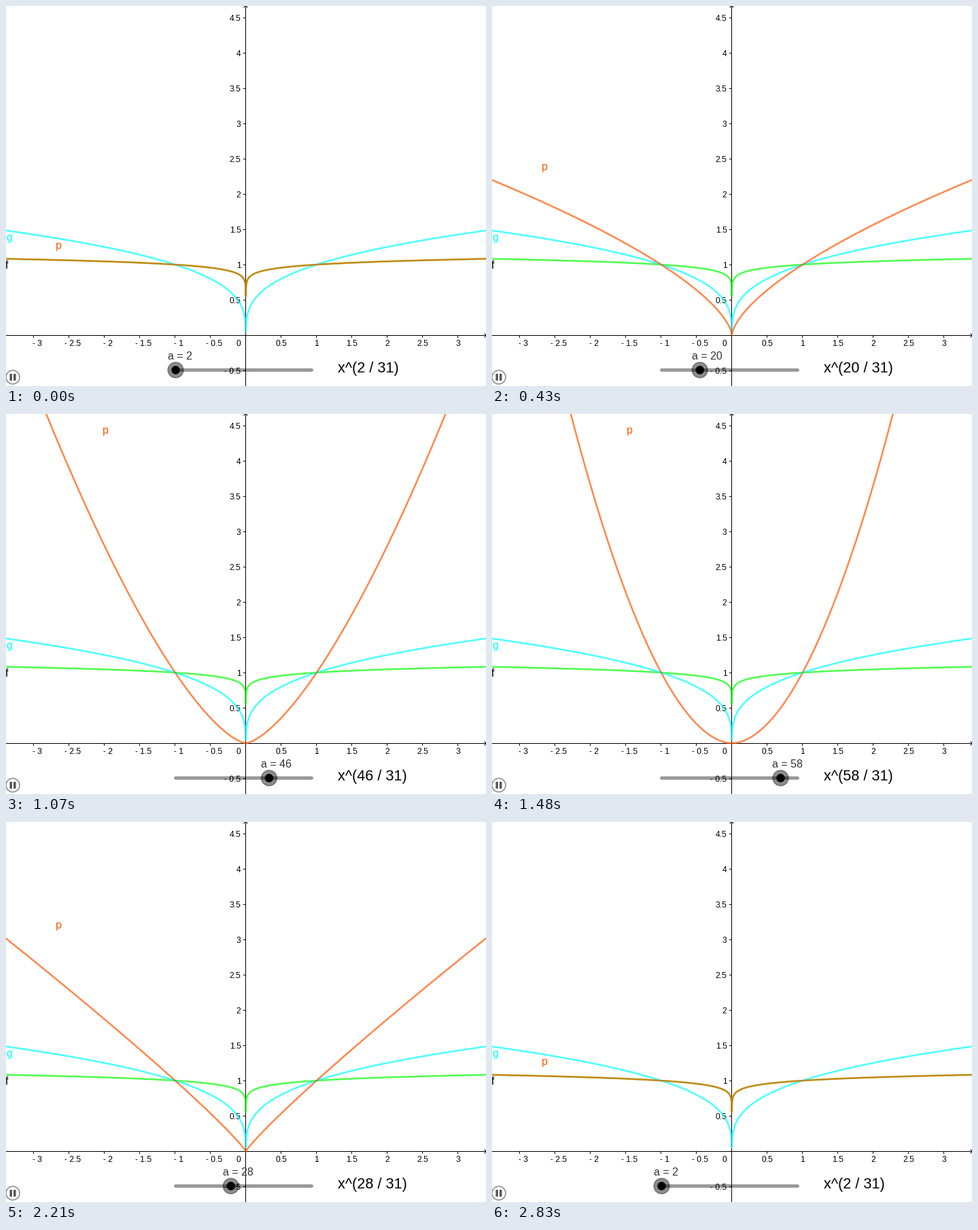
Animation of 706x560 px, one loop 2.88 s. Source, as a matplotlib script:

```python
import numpy as np
import matplotlib.pyplot as plt
from matplotlib.animation import FuncAnimation
from matplotlib.patches import Circle, Rectangle

W, H, DPI = 706, 560, 100
PX = 72 / DPI                 # points per pixel
AX, AY = 352.5, 485.5         # axis lines, on pixel centres
OX, OY, UNIT = 352.8, 485.1, 104
LOOP, TICK = 2880, 10
STEPS = 59                    # slider runs 2..60 and back to 2
DEN = 31
BAR_X, BAR_Y, BAR_STEP = 249.5, 536.5, 3.125

ORANGE = (1, 1 / 3, 0)
CYAN = (0, 1, 1)
GREEN = (0, 1, 0)

# Start time of each slider step, slightly uneven
KEY_STEPS = [0, 1, 9, 12, 24, 30, 34, 35, 57, 59]
KEY_TIMES = [0, 50, 430, 570, 1170, 1480, 1670, 1710, 2780, 2880]
STARTS = np.round(np.interp(np.arange(STEPS), KEY_STEPS, KEY_TIMES) / 10) * 10

plt.rcParams["font.family"] = "Liberation Sans"
fig = plt.figure(figsize=(W / DPI, H / DPI), dpi=DPI, facecolor="white")
ax = fig.add_axes([0, 0, 1, 1])
ax.set_xlim(0, W)
ax.set_ylim(H, 0)
ax.axis("off")


def label(x, y, s, size=12, color="black", ha="left", z=1):
    return ax.text(x, y, s, fontsize=size * PX, color=color, ha=ha,
                   va="baseline", zorder=z)


def stroke(xs, ys, width=1, color="black", z=1, **kw):
    return ax.plot(xs, ys, color=color, lw=width * PX, zorder=z,
                   snap=False, **kw)[0]


def number(v):
    return ("- " if v < 0 else "") + f"{abs(v):g}"


def draw_axes():
    stroke([0, W], [AY, AY])
    stroke([AX, AX], [0, H])
    stroke([350, AX, 355], [2, -0.5, 2])
    stroke([704, 706.5, 704], [483, AY, 488])
    for k in range(-6, 7):
        if k:
            x = AX + k * UNIT / 2
            stroke([x, x], [AY, AY + 3.5], solid_capstyle="butt")
            label(x + (5.5 if k < 0 else 0), 501, number(k / 2), ha="center")
    label(341.5, 501, "0", ha="center")
    for k in range(-1, 10):
        if k:
            y = AY - k * UNIT / 2
            stroke([AX - 3.5, AX], [y, y], solid_capstyle="butt")
            label(345.5, y + 4.5, number(k / 2), ha="right")


def draw_pause():
    ax.add_patch(Circle((10, 547), 10, fc="white", ec="#8a8a8a",
                        lw=1.6 * PX, zorder=6))
    for x in (5.5, 11):
        ax.add_patch(Rectangle((x, 542), 3.5, 10, fc="#555555", lw=0,
                               snap=False, zorder=7))


side = np.geomspace(1e-4, 3.5, 400)
xs = np.concatenate([-side[::-1], side])


def power_y(p, x=xs):
    return OY - UNIT * np.abs(x) ** p


def curve(p, color, z):
    return stroke(OX + UNIT * xs, power_y(p), 2.5, color, z, alpha=0.7,
                  solid_joinstyle="round")


draw_axes()
draw_pause()
curve(2 / DEN, GREEN, 2)
curve(10 / DEN, CYAN, 3)
label(-1, 387, "f", 16, z=5)
label(0, 346, "g", 16, CYAN, z=5)
p_curve = curve(2 / DEN, ORANGE, 4)
p_label = label(73, 358, "p", 16, ORANGE, z=5)

stroke([BAR_X, BAR_X + 64 * BAR_STEP], [BAR_Y, BAR_Y], 5, z=6, alpha=0.4,
       solid_capstyle="round")
knob = Circle((BAR_X, BAR_Y), 11.5, fc=(0, 0, 0, 0.45), ec=(0, 0, 0, 0.5),
              lw=PX, zorder=7)
dot = Circle((BAR_X, BAR_Y), 6.2, fc="black", lw=0, zorder=8)
ax.add_patch(knob)
ax.add_patch(dot)
a_label = label(0, 521, "", 16, "#333333", z=9)
formula = label(488, 540, "", 21.7, z=9)


def update(frame):
    step = np.searchsorted(STARTS, frame * TICK, side="right") - 1
    a = 2 + 2 * min(step, STEPS - 1 - step)
    p = a / DEN

    p_curve.set_ydata(power_y(p))
    # Label follows the point where the curve enters the view
    top_x = OX - UNIT * (OY / UNIT) ** (1 / p)
    left_y = power_y(p, OX / UNIT)
    p_label.set_position((int(max(73, top_x + 83)), int(max(29, left_y - 14))))

    x = BAR_X + (a - 2) * BAR_STEP
    knob.center = dot.center = (x, BAR_Y)
    a_label.set_position((x - 12, 521))
    a_label.set_text(f"a = {a}")
    formula.set_text(f"x^({a} / {DEN})")
    return p_curve, p_label, knob, dot, a_label, formula


anim = FuncAnimation(fig, update, frames=LOOP // TICK, interval=TICK,
                     repeat=True, repeat_delay=0, blit=False)
plt.show()
```
